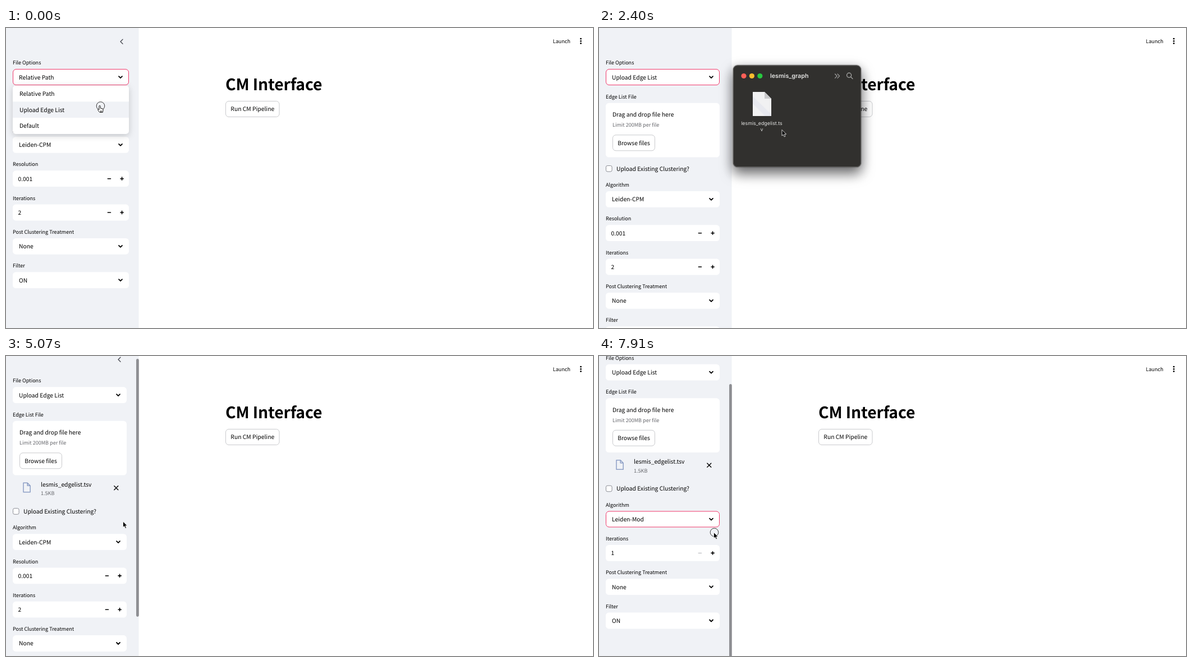
Write an HTML page that moves like this. It is 1046 px wide and 535 px high and loops after 8000 ms.

```html
<!DOCTYPE html>
<html lang="en">
<head>
<meta charset="utf-8">
<title>CM Interface</title>
<style>
html, body { margin: 0; width: 100%; height: 100%; overflow: hidden; background: #fff; }
svg { display: block; width: 1046px; height: 535px; }
text { font: 10.3px "Noto Sans CJK JP", "Noto Sans CJK SC", "Noto Sans", sans-serif; fill: #000; text-rendering: geometricPrecision; white-space: pre; }
.small { font-size: 9.05px; }
.gray { fill: #66676c; }
.mid { text-anchor: middle; }
.title { font-size: 28.3px; font-weight: 700; letter-spacing: -.14px; }
.mac { font: 8.85px Inter, Roboto, sans-serif; fill: #e4e4e3; }
.bold { font-size: 10.7px; font-weight: 600; }
.tip { font-size: 10px; fill: #d2d2d2; }
.line { fill: none; stroke: #000; stroke-linecap: round; stroke-linejoin: round; }
.list { filter: drop-shadow(0 3px 6px rgba(0,0,0,.18)); }
.window { filter: drop-shadow(0 0 1px #0009) drop-shadow(0 11px 11px rgba(0,0,0,.55)) drop-shadow(0 2px 9px rgba(40,40,60,.15)); }
</style>
</head>
<body>
<svg id="stage" viewBox="0 0 1046 535"></svg>
<script>
const LOOP = 8000, TICK = 150, ROW = 28.8, PITCH = 60.3;
const PINK = '#f0386b', EDGE = '#c9cacd';

// time, x, y of the pointer
const POINTER = [
  [0, 167.5, 139], [300, 167.5, 141], [1050, 335, 528], [1200, 371, 545], [1650, 371, 545],
  [2250, 329, 192], [2400, 326, 181.5], [2550, 326, 181.5], [2850, 290, 122], [3150, 290, 122],
  [3600, 153, 159], [4170, 153, 159], [4620, 208.5, 295], [5520, 208.5, 295],
  [5820, 197, 247.5], [6120, 197, 250], [6570, 204.5, 314.5], [LOOP, 204.5, 314.5]
];
const SHAPES = [[0, 'hand'], [450, 'arrow'], [5670, 'beam'], [6270, 'hand'], [6870, 'arrow']];
const PRESSES = [[0, 150], [3150, 3720], [4620, 4770], [5820, 5970], [6570, 6720], [7910, LOOP]];
const CARETS = [[1350, 1800], [3720, 4320], [7310, 7760]];
// time, scroll offset, scrollbar top
const SCROLL = [
  [0, 0, -3], [4920, 0, -3], [5070, 18, 5], [5220, 45, 30], [5520, 83, 64], [5670, 90, 70],
  [5820, 90.5, 71], [6720, 90.5, 71], [7010, 58.5, 50], [LOOP, 58.5, 50]
];

const within = (spans, t) => spans.some(([a, b]) => t >= a && t < b);
const latest = (rows, t) => rows.findLast(r => r[0] <= t);
function tween(rows, t) {
  const i = Math.max(1, rows.findIndex(r => r[0] > t));
  const a = rows[i - 1], b = rows[i], k = (t - a[0]) / (b[0] - a[0]);
  return a.slice(1).map((v, n) => v + (b[n + 1] - v) * k);
}
function quantize(t) {
  const start = [0, 3720, 7010].findLast(s => s <= t);
  return start + Math.floor((t - start) / TICK) * TICK;
}

const text = (x, y, s, cls = '') => `<text x="${x}" y="${y}" class="${cls}">${s}</text>`;
const rect = (x, y, w, h, fill, stroke = 'none', r = 5.5) =>
  `<rect x="${x}" y="${y}" width="${w}" height="${h}" rx="${r}" fill="${fill}" stroke="${stroke}"/>`;
const line = (d, w = 1.6, color = '#000') =>
  `<path class="line" d="${d}" style="stroke:${color};stroke-width:${w}"/>`;
const dot = (x, y, r, fill) => `<circle cx="${x}" cy="${y}" r="${r}" fill="${fill}"/>`;
const button = (x, y, w, s) =>
  rect(x + .5, y + .5, w - 1, 28, '#fff', EDGE) + text(x + w / 2, y + 18.2, s, 'mid');
const label = (y, s) => text(12, y + 3.4, s, 'small');

function select(y, right, name, value, focus, caretX) {
  const mid = y + 25.7;
  return label(y, name) +
    (focus ? rect(12.5, y + 11.6, right - 13, 28, '#fff', PINK) : rect(12, y + 11.3, right - 12, ROW, '#fff')) +
    text(23, mid + 3.9, value) +
    line(`M${right - 18} ${mid - 1.5}l3 3l3 -3`, 1.8) +
    (caretX ? line(`M${caretX} ${mid - 6.5}v13`, 1) : '');
}
function number(y, right, name, value, atMin) {
  const mid = y + 25.7;
  return label(y, name) + rect(12, y + 11.3, right - 12, ROW, '#fff') +
    text(21.5, mid + 3.9, value) +
    line(`M${right - 37.7} ${mid}h5.2`, 1.5, atMin ? '#c4c5c9' : '#000') +
    line(`M${right - 15} ${mid}h5.2m-2.6 -2.6v5.2`, 1.6);
}
function options(y, right, names, active) {
  const rows = names.map((s, i) =>
    (i === active ? rect(12, y + i * ROW, right - 12, ROW, '#f0f2f6', 'none', 0) : '') +
    text(24, y + (i + .5) * ROW + 3.9, s));
  return `<g class="list">${rect(12, y, right - 12, ROW * names.length, '#fff')}</g>` + rows.join('');
}

function uploader() {
  return label(122.3, 'Edge List File') + rect(12, 133.8, 203, 96.8, '#fff') +
    text(24, 158, 'Drag and drop file here') +
    text(24, 176.2, 'Limit 200MB per file', 'small gray') +
    button(24, 190.3, 76, 'Browse files');
}
function uploadedFile() {
  return line('M31 244.3h7.2l5 5v11.4h-12.2zM38.2 244.3v5h5', 1.5, '#8d9fc6') +
    text(62, 250.6, 'lesmis_edgelist.tsv') + text(62, 266.3, '1.5KB', 'small gray') +
    line('M192.8 249.8l7 7m0 -7l-7 7', 1.4);
}

function sidebar(t, hover) {
  const before = t < 300, hasFile = t >= 3870, reduced = t >= 6870;
  const right = before ? 219 : 215;
  const [scroll, barTop] = tween(SCROLL, t);
  const caret = within(CARETS, t);
  const shift = hasFile ? 44.2 : 0;
  const algorithmY = before ? 182.7 : 279.7 + shift;
  let y = algorithmY, out = '';
  const next = () => y += PITCH;

  if (hover) out += line(`M${right - 11} 20.3l-4 4l4 4`, 1.3, '#44464f');
  out += select(62, right, 'File Options', before ? 'Relative Path' : 'Upload Edge List',
    t < 4620, caret && t < 5000 ? 105 : 0);
  if (!before) {
    out += uploader() + (hasFile ? uploadedFile() : '') +
      rect(12.5, 245.5 + shift, 10.6, 10.6, '#fff', '#8b8d95', 2.6) +
      text(31, 254.7 + shift, 'Upload Existing Clustering?');
  }
  out += select(y, right, 'Algorithm', t < 6720 ? 'Leiden-CPM' : 'Leiden-Mod',
    t >= 5970, caret && t > 5000 ? 81.5 : 0);
  if (!reduced) out += number(next(), right, 'Resolution', '0.001');
  out += number(next(), right, 'Iterations', reduced ? '1' : '2', reduced);
  out += select(next(), right, 'Post Clustering Treatment', 'None');
  out += select(next(), right, 'Filter', 'ON');
  if (before) out += options(102.5, right, ['Relative Path', 'Upload Edge List', 'Default'], 1);
  if (t >= 5970 && t < 6720) {
    out += options(algorithmY + 40.5, right, ['Leiden-CPM', 'Leiden-Mod'], t < 6420 ? 0 : 1);
  }

  const barHeight = reduced ? 495 : hasFile ? 460 : 498;
  const bar = hover && !before ? rect(232, barTop, 4.8, barHeight, '#8e8f93', 'none', 2.4) : '';
  return rect(0, 0, 236.5, 535, '#f0f2f6', 'none', 0) +
    `<g transform="translate(0 ${-scroll})">${out}</g>` + bar;
}

const page = text(391, 110.6, 'CM Interface', 'title') + button(391, 130, 96.5, 'Run CM Pipeline') +
  text(974.5, 26.9, 'Launch', 'small') + [19.2, 23.3, 27.4].map(y => dot(1024.3, y, 1.4, '#000')).join('');

const paper = (x, y) => `<g transform="translate(${x} ${y})">
  <path d="M0 0H21L33 12V43H0Z" fill="#f1f1f2"/><path d="M0 8L33 40V43H22L0 21Z" fill="#e8e9ef"/>
  <path d="M21 0V12H33Z" fill="#c9c9cb"/></g>`;

const fileWindow = `<g class="window">${rect(239, 66.5, 228, 181.5, '#31302e', 'none', 8)}</g>` +
  rect(239.5, 67, 227, 180.5, 'none', '#5c5b59', 7.5) +
  dot(258, 85.5, 4.6, '#ff5f57') + dot(272.4, 85.5, 4.6, '#febc2e') + dot(286.8, 85.5, 4.6, '#28c840') +
  text(305, 89.2, 'lesmis_graph', 'mac bold') +
  line('M420.5 82l3.7 3.7l-3.7 3.7m4.4 -7.4l3.7 3.7l-3.7 3.7', 1.1, '#a9a9a8') +
  line('M449.6 84.2a4 4 0 1 0 -8 0a4 4 0 1 0 8 0M448.6 87.2l3.4 3.4', 1.2, '#b4b4b3') +
  paper(274, 114) + text(290, 172.5, 'lesmis_edgelist.ts', 'mac mid') + text(290, 184.2, 'v', 'mac mid');

const tooltip = rect(346, 524.5, 49.5, 20, '#6b6b6b', '#222', 3.5) + text(370.5, 537.8, 'Viewer', 'mac tip mid');

const CURSORS = {
  arrow: '<path d="M0 0V10.6L2.4 8.5L4.2 12.4L6 11.6L4.3 7.8H7.6Z" fill="#000" stroke="#fff" stroke-width=".8"/>',
  hand: '<path d="M-1.6 6V.6Q-1.5 -.6 -.5 -.6Q.6 -.6 .7 .6V4L4.6 5Q5.8 5.4 5.6 7L4.8 11.4H-.6L-3.7 7.3Q-4.1 6.2 -3.2 5.8Q-2.4 5.5 -1.6 6.7ZM1 11V8.4M2.8 11V8.4" fill="#fff" stroke="#000" stroke-width=".9" stroke-linejoin="round"/>',
  beam: '<path class="line" d="M-2 -4.5Q0 -4.5 0 -3V5Q0 6.2 -2 6.2M2 -4.5Q0 -4.5 0 -3M0 5Q0 6.2 2 6.2M-1 2.5H1" stroke-width=".9"/>'
};
function pointer(t, x, y) {
  const ring = within(PRESSES, t) ? '<circle cx="1" cy="0" r="7.3" fill="none" stroke="#222" stroke-width=".9"/>' : '';
  return `<g transform="translate(${x} ${y})">${ring}${CURSORS[latest(SHAPES, t)[1]]}</g>`;
}

function draw(t) {
  const [x, y] = tween(POINTER, t);
  const windowOpen = t >= 1950 && t < 3720;
  const dragging = t >= 3300 && t < 3720;
  return page + sidebar(t, x < 237 && !windowOpen) +
    (t >= 1200 && t < 1800 ? tooltip : '') +
    (windowOpen ? fileWindow : '') +
    (dragging ? `<g opacity=".6">${paper(x - 16, y - 8)}</g>` : '') +
    pointer(t, x, y);
}

const stage = document.getElementById('stage');
const began = performance.now();
let shown = -1;
function frame() {
  const t = quantize((performance.now() - began) % LOOP);
  if (t !== shown) stage.innerHTML = draw(shown = t);
  requestAnimationFrame(frame);
}
frame();
</script>
</body>
</html>
```
